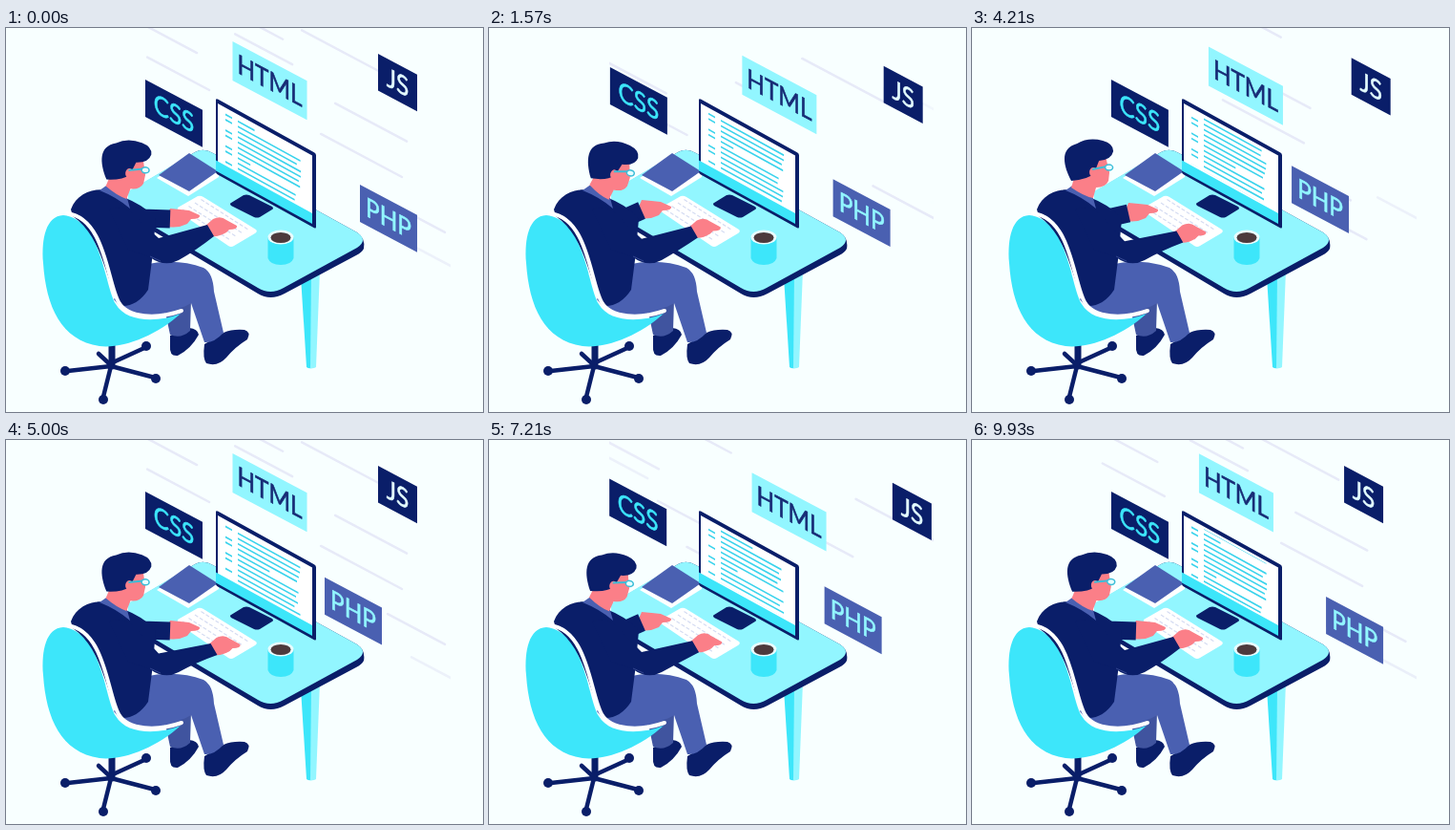
An HTML page that plays this animation: 500x402 px, repeating every 10000 ms.

```html
<!DOCTYPE html>
<html lang="en">
<head>
<meta charset="utf-8">
<title>Developer at work</title>
<style>
html, body { margin: 0; width: 100%; height: 100%; overflow: hidden; background: #f8ffff; }
svg { display: block; width: 100vw; height: 100vh; }
text { font: 28px Lato, sans-serif; text-anchor: middle; stroke-width: .6; }
.navy { fill: #0a1e69; }
.blue { fill: #4a60b1; }
.cyan { fill: #3de6fa; }
.pale { fill: #92f6ff; }
.skin { fill: #fb7f88; }
.white { fill: #fff; }
.line { fill: none; stroke: #0a1e69; stroke-linecap: round; }
</style>
</head>
<body>
<svg viewBox="0 0 500 402" preserveAspectRatio="none">
  <defs>
    <clipPath id="screen"><rect x="4" y="7" width="96" height="56"/></clipPath>
    <clipPath id="sky"><rect x="126" width="340" height="270"/></clipPath>
  </defs>
  <g id="streaks" clip-path="url(#sky)" fill="none" stroke="#e7eaf8" stroke-width="2.500" stroke-linecap="round"></g>
  <g id="labels"></g>

  <!-- desk -->
  <path class="cyan" d="M309 260 L321 256 L321 356 Q317 357 315 355Z"/>
  <path class="pale" d="M320 256 L329 253 L325 355 Q322 357 319 356Z"/>
  <path class="navy" d="M128 172 L198 130 Q207 125 217 131 L368 214 Q377 220 375 231 Q373 235 367 238 L292 278 Q277 286 264 278 L128 197Z"/>
  <path class="pale" d="M128 171 L198 130 Q207 125 217 131 L368 214 Q380 222 368 230 L291 272 Q277 280 264 272 L128 192Z"/>

  <!-- notebook -->
  <path class="white" d="M158 157 L190 136 L223 153 L223 156 L191 176Z"/>
  <path class="blue" d="M160 154 L192 131 L222 150 L192 171Z"/>

  <!-- monitor -->
  <g transform="matrix(1 .55 0 1 220 73.500)">
    <rect class="navy" width="105" height="79" rx="2"/>
    <rect class="white" x="2" y="4.500" width="99" height="62"/>
    <rect class="cyan" y="65" width="101" height="11"/>
    <g id="code" clip-path="url(#screen)"></g>
  </g>

  <!-- keyboard, phone, cup -->
  <path class="white" d="M180 188 L201 176 Q204 175 207 177 L262 211 Q264 213 261 215 L239 228 Q236 230 233 228 L180 192Z"/>
  <g id="keys" fill="none" stroke="#d5dcf2" stroke-width="1.2" stroke-dasharray="4 2"></g>
  <path class="navy" d="M236 183 L249 175 Q252 174 255 175 L279 187 Q281 189 279 190 L266 198 Q263 199 260 198 L236 186 Q234 184 236 183Z"/>
  <path class="cyan" d="M274.500 219 V241 Q277 248 288 248 Q299 248 301.500 241 V219Z"/>
  <ellipse cx="288" cy="219" rx="13.5" ry="7.5" fill="#e9fdff"/>
  <ellipse cx="288" cy="219.5" rx="10.5" ry="5.5" fill="#4d3a3d"/>

  <!-- chair base -->
  <g class="line" stroke-width="4.500">
    <path d="M111 330 V354" stroke-width="7"/>
    <path d="M110 354 L65 359 M110 354 L102 386 M110 354 L156 366 M110 351 L145 335 M110 353 L97 341"/>
  </g>
  <g class="navy">
    <circle cx="62" cy="359" r="5"/><circle cx="102" cy="389" r="5"/>
    <circle cx="157" cy="367" r="5"/><circle cx="147" cy="333" r="5"/>
  </g>

  <!-- legs -->
  <path class="navy" d="M172 322 L192 314 Q201 315 202 321 Q194 336 180 343 Q171 344 172 333Z"/>
  <path d="M165 288 L194 284 L193 317 Q183 326 172 321Z" fill="#40549f"/>
  <path class="navy" d="M208 331 L228 319 Q237 315 250 316 Q257 318 253 326 Q240 334 231 345 Q222 355 210 351 Q206 346 208 331Z"/>

  <!-- chair shell -->
  <path class="cyan" d="M60 196 C42 197 37 220 39 246 C42 292 58 327 98 333 C122 336 158 322 183 299 C158 309 126 308 115 289 C103 268 100 200 60 196Z"/>
  <path class="blue" d="M113 284 L144 248 Q178 240 207 251 Q217 256 218 276 L228 319 Q218 330 208 329 L194 288 Q183 295 158 301 Q128 304 113 284Z"/>

  <!-- far arm -->
  <g id="farHand"><path class="skin" d="M155 194 L160 182 Q171 183 180 184 L191 189 Q192 193 182 193 L178 198 Q168 203 158 201Z"/></g>
  <path id="farArm" class="line" stroke-width="19" style="stroke-linecap:butt;stroke-linejoin:round"/>

  <!-- torso -->
  <path class="navy" d="M68 190 C74 173 92 167 107 170 L132 181 Q150 190 157 200 L153 243 L149 274 Q138 291 122 291 C104 270 104 221 70 197Z"/>
  <path class="blue" d="M98 170 L108 163 L127 178 L130 189 Q116 177 98 170Z"/>
  <path d="M64 194 C104 199 106 266 118 287 C128 304 158 305 184 296" fill="none" stroke="#fff" stroke-width="4" stroke-linecap="round"/>

  <!-- head -->
  <g id="head">
    <path class="skin" d="M108 154 L125 138 L140 135 L144 151 L143 160 Q140 167 130 167 L127 178 Q117 176 104 167Z"/>
    <path class="navy" d="M104 160 C95 143 92 126 110 121 Q122 114 137 118 Q148 121 148 129 Q146 138 133 139 L128 152 Q121 159 104 160Z"/>
    <ellipse class="skin" cx="127" cy="151" rx="4" ry="5"/>
    <path d="M126 148 L141 145" fill="none" stroke="#3bbdd8" stroke-width="2"/>
    <ellipse cx="143.500" cy="146" rx="4" ry="3" fill="#e8feff" stroke="#3bbdd8" stroke-width="1.500"/>
  </g>

  <!-- near arm -->
  <g id="nearHand"><path class="skin" d="M208 207 L216 200 Q224 196 230 201 L241 207 Q242 211 233 211 L230 214 Q222 219 214 218Z"/></g>
  <path id="nearArm" class="navy"/>
  <path d="M151 239 L162 244" fill="none" stroke="#32458f" stroke-width="1"/>
</svg>
<script>
const NS = 'http://www.w3.org/2000/svg';
const LOOP = 10000, TAU = Math.PI * 2, SLOPE = 0.53;
const $ = id => document.getElementById(id);

function add(parent, tag, attrs) {
  const el = document.createElementNS(NS, tag);
  for (const k in attrs) el.setAttribute(k, attrs[k]);
  return parent.appendChild(el);
}
const place = (el, x, y) => el.setAttribute('transform', `translate(${x.toFixed(2)} ${y.toFixed(2)})`);
const swing = p => (1 - Math.cos(TAU * p)) / 2;
const half = t => (t % 5000) / 5000;

function cssShift(t) {
  if (t < 5000) return -23 * swing(Math.min(t / 4300, 1));
  return -20.5 * swing((t - 5000) / 5000);
}

const labels = [
  { text: 'CSS', x: 146, y: 54, w: 60, h: 39, box: '#0a1e69', ink: '#3de6fa', slope: .68, shift: cssShift },
  { text: 'HTML', x: 237.5, y: 14, w: 78, h: 41, box: '#92f6ff', ink: '#172b75', slope: SLOPE,
    shift: t => 38 * swing(half(t)) - 2 * Math.sin(2 * TAU * half(t)) },
  { text: 'JS', x: 390, y: 27, w: 41, h: 38.5, box: '#0a1e69', ink: '#e3fbff', slope: .54,
    shift: t => 34 * swing(half(t)) },
  { text: 'PHP', x: 371, y: 164, w: 60, h: 39, box: '#4a60b1', ink: '#92f6ff', slope: .55,
    shift: t => -37 * swing(t / LOOP) - 2.5 * Math.sin(TAU * t / LOOP) }
];
for (const l of labels) {
  l.el = add($('labels'), 'g', {});
  const drop = l.w * SLOPE;
  add(l.el, 'path', { d: `M0 0 L${l.w} ${drop} V${drop + l.h} L0 ${l.h}Z`, fill: l.box });
  add(l.el, 'text', {
    transform: `matrix(.87 ${SLOPE * .87} 0 1 ${l.w / 2} ${drop / 2 + l.h / 2 + 9.7})`, fill: l.ink, stroke: l.ink
  }).textContent = l.text;
}

// Lane offset, start, length, passes per loop
const streaks = [
  [-162, 310, 80, 2], [-142, 190, 100, 2], [-121, 240, 60, 4], [-104, 345, 75, 2], [-80, 130, 70, 2],
  [-64, 330, 85, 2], [-48, 148, 65, 4], [-30, 400, 60, 2], [2, 425, 50, 2]
].map(([b, x, len, n]) => ({
  b, x, len, n, el: add($('streaks'), 'path', { d: `M0 0 L${len} ${len * SLOPE}` })
}));

// Code rows repeat after ROWS lines
const ROWS = 20, PITCH = 5.5;
const rows = Array.from({ length: ROWS }, (_, i) => {
  const rand = Math.abs(Math.sin(i * 12.9 + 2) * 437.5) % 1;
  const end = i % 7 === 1 ? 34 + 25 * rand : 82 + 8 * rand;
  let d = `M23 0 H${end.toFixed(1)}`;
  if (i % 3) d += ' M10 0 H17';
  return add($('code'), 'path', { d, stroke: '#3bd3ec', 'stroke-width': 1.8 });
});

for (let i = 0; i < 4; i++) {
  const x = 185 + i * 6.5, y = 190 - i * 3.5;
  add($('keys'), 'path', { d: `M${x} ${y} l50 32` });
}

function draw(t) {
  const p = half(t), s = Math.sin(TAU * p);
  for (const l of labels) {
    const d = l.shift(t);
    place(l.el, l.x + d, l.y + d * l.slope);
  }
  for (const k of streaks) {
    const span = 340 + k.len, from = 126 - k.len;
    const x = from + (k.x - from + span * k.n * t / LOOP) % span;
    place(k.el, x, x * SLOPE + k.b);
    k.el.setAttribute('opacity', Math.min(1, (x - from) / 60, (466 - x) / 60).toFixed(2));
  }
  rows.forEach((el, i) => {
    const span = ROWS * PITCH;
    place(el, 0, 6 + (i * PITCH + span - span * t / LOOP) % span);
  });

  const tilt = 6 + 6 * Math.sin(s * Math.PI / 2);
  $('head').setAttribute('transform', `rotate(${tilt.toFixed(2)} 118 172)`);

  let reach = 0;
  if (p < .14) reach = 1 - swing(p / .28);
  else if (p > .74) reach = swing((p - .74) / .52);
  const fx = 12 * reach, fy = 9 * reach - 2;
  place($('farHand'), fx, fy);
  $('farArm').setAttribute('d', `M124 194 L142 199 L${160 + fx} ${193 + fy}`);

  const dy = 7 * swing(t / LOOP), dx = dy / 2;
  place($('nearHand'), 1 + dx, dy);
  $('nearArm').setAttribute('d',
    `M108 190 Q128 183 142 204 L160 ${220 + dy / 2} L${211 + dx} ${206 + dy} L${218 + dx} ${218 + dy} ` +
    'Q199 233 181 243 Q166 251 151 240 L128 232Z');
}

const start = performance.now();
function tick(now) {
  draw(Math.max(0, now - start) % LOOP);
  requestAnimationFrame(tick);
}
draw(0);
requestAnimationFrame(tick);
</script>
</body>
</html>
```
